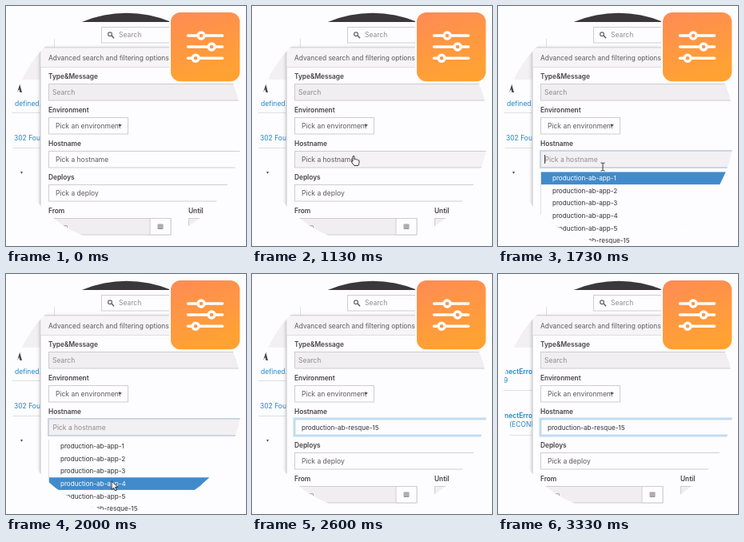
Recreate the animation shown at these times as an HTML page. Size 300 by 300 pixels, loop 3400 ms.

```html
<!DOCTYPE html>
<html lang="en">
<head>
<meta charset="utf-8">
<style>
  html, body { margin: 0; width: 100%; height: 100%; overflow: hidden; background: #fdfcfe; }
  svg { display: block; width: 300px; height: 300px; font: 8.5px Inter, sans-serif; fill: #5c595d; }
  #page text { opacity: var(--fade); }
  .label { font-weight: 600; font-size: 8.3px; fill: #454246; }
  .box { fill: #fdfcfe; stroke: #cfcdd0; }
  .off { fill: #f0eef1; }
  .hint { fill: #8f8c90; }
  .host { font-size: 8.1px; fill: #333; }
  .link { fill: #1f88c9; }
  .rule { stroke: #e0dee1; fill: none; }
</style>
</head>
<body>
<svg viewBox="0 0 300 300">
  <defs>
    <clipPath id="lens"><circle cx="150.7" cy="153.3" r="144.5"/></clipPath>
    <linearGradient id="orange" x1="0" y1="0" x2=".3" y2="1">
      <stop stop-color="#ff8b55"/><stop offset="1" stop-color="#ffa233"/>
    </linearGradient>
    <filter id="shadow" x="-10%" width="120%"><feDropShadow dx="0" dy="1" stdDeviation="2" flood-opacity=".25"/></filter>
  </defs>

  <g clip-path="url(#lens)">
    <rect width="300" height="20" fill="#3b383c"/>
    <path class="rule" d="M60.5 41V52"/>
    <rect class="box" x="119.5" y="26.5" width="110" height="19.5"/>
    <g fill="none" stroke="#666" stroke-width="1.2"><circle cx="130" cy="35.2" r="2.4"/><path d="M132 37L135 40.3" stroke-width="1.6"/></g>
    <text class="hint" x="141" y="39.3">Search</text>

    <g id="page">
      <rect y="52" width="60" height="40" fill="#f2f0f3"/>
      <g id="before">
        <path d="M14 108L17 97L20 108H17.5L16.2 104Z" fill="#4a474b"/>
        <text class="link" x="11" y="124.5">defined.</text>
        <text class="link" x="10" y="168">302 Found</text>
        <path d="M18 207H21L19.5 210Z" fill="#555"/>
        <path class="rule" d="M0 133.5H43M0 177.5H43"/>
      </g>
      <g id="after" class="link">
        <text x="8" y="124.5" font-weight="600">nectError</text>
        <text x="7" y="136">9</text>
        <text x="8" y="179.5" font-weight="600">nectError</text>
        <text x="14" y="191">(ECONN</text>
        <path class="rule" d="M0 145.5H43M0 201.5H43"/>
      </g>

      <rect x="43" y="52" width="270" height="260" fill="#fdfcfe" stroke="#c4c2c5" filter="url(#shadow)"/>
      <rect x="43.5" y="52.5" width="260" height="24" fill="#f6f4f7"/>
      <path class="rule" d="M43 76.5H300"/>
      <text x="53" y="68" font-size="8.4">Advanced search and filtering options</text>
      <g id="form"></g>

      <rect class="box off" x="53.5" y="265.5" width="152.5" height="20.5"/>
      <rect class="box" x="180" y="265.5" width="26" height="20.5"/>
      <text class="hint" x="57" y="279">From</text>
      <path d="M190 273h6v5.5h-6zM190 275h6M190 277h6M192 273v5.5M194 273v5.5" fill="none" stroke="#77747a" stroke-width=".7"/>
      <rect class="box off" x="228.5" y="265.5" width="80" height="20.5"/>
      <path d="M140.2 148.2h4.6l-2.3 2.8z" fill="#4a474b"/>

      <g id="list">
        <rect x="53" y="205" width="260" height="110" fill="#fdfcfe"/>
        <path class="rule" d="M53.5 207V300"/>
        <rect id="mark" x="54" width="260" height="15.6" fill="#428bca"/>
      </g>
    </g>

    <path id="caret" d="M58.5 186V197" stroke="#444"/>
    <g id="cursor" stroke="#222" stroke-width=".9" stroke-linejoin="round" fill="#fff">
      <path id="arrow" d="M0 0V10.5L2.5 8.2L4.2 12L6 11.2L4.4 7.5H7.6Z"/>
      <path id="hand" d="M-1 1Q0-.6 1 1V4.8Q2.4 3.7 3.3 5Q4.7 4.2 5.4 5.6Q7 5.2 7 7V9.2L5.8 12.5H.8L-2.6 8Q-2.8 6.2-1 7.2Z"/>
      <path id="beam" fill="none" d="M-2.5-5Q0-5 0-4Q0-5 2.5-5M0-4V4M-2.5 5Q0 5 0 4Q0 5 2.5 5"/>
    </g>
  </g>

  <rect x="206" y="8" width="86.3" height="86.3" rx="12" fill="url(#orange)" stroke="#fdfcfe" stroke-width="4" paint-order="stroke"/>
  <g id="sliders" stroke="#fff" stroke-width="3.4" stroke-linecap="round" fill="#ff9747"></g>
</svg>
<script>
const $ = id => document.getElementById(id);
const add = (id, markup) => $(id).insertAdjacentHTML("beforeend", markup);
const show = (id, on) => $(id).setAttribute("visibility", on ? "inherit" : "hidden");
const clamp = (v, lo, hi) => Math.min(hi, Math.max(lo, v));
const LOOP = 3400, OPEN = 1300, PICK = 2430, RELOAD = 2770, LOADED = 3200;
const ROW = 15.6, LIST_TOP = 207.5;

[["Type&amp;Message", "Search", 260], ["Environment", "Pick an environment", 99],
 ["Hostname", "Pick a hostname", 260], ["Deploys", "Pick a deploy", 260]].forEach(([label, hint, width], i) => {
  const y = 91 + i * 42;
  add("form", `<text class="label" x="53" y="${y}">${label}</text>
    <rect id="box${i}" class="box${i ? "" : " off"}" x="53.5" y="${y + 6.5}" width="${width}" height="20.5"/>
    <text id="hint${i}" class="${i ? "" : "hint"}" x="${i ? 62 : 58}" y="${y + 19.7}">${hint}</text>`);
});
add("form", `<text class="label" x="53" y="259">From</text><text class="label" x="228" y="259">Until</text>
  <rect id="focus" x="53" y="181" width="260" height="21" fill="none"/>`);

["app-1", "app-2", "app-3", "app-4", "app-5", "resque-15"].forEach((name, i) =>
  add("list", `<text id="row${i}" class="host" x="68" y="${LIST_TOP + 10.6 + i * ROW}">production-ab-${name}</text>`));

[[37, 244], [51, 257], [65.3, 237]].forEach(([y, x]) =>
  add("sliders", `<path d="M227.5 ${y}H270.5"/><circle cx="${x}" cy="${y}" r="4"/>`));

// Cursor stops: time, x, y
const stops = [[40, 236, 76], [520, 141, 148], [640, 141, 148], [1060, 127, 187],
  [1330, 127, 187], [1600, 131, 201], [1730, 131, 201], [2230, 133, 304]];

function cursorAt(t) {
  const next = stops.findIndex(s => s[0] > t);
  if (next < 1) return stops.at(next).slice(1);
  const [t0, x0, y0] = stops[next - 1], [t1, x1, y1] = stops[next];
  const p = (t - t0) / (t1 - t0), e = p * p * (3 - 2 * p);
  return [x0 + (x1 - x0) * e, y0 + (y1 - y0) * e];
}

// Text dims while the page reloads, then comes back
function fadeAt(t) {
  if (t >= LOADED) return .5 + clamp((t - LOADED) / 130, 0, 1) * .5;
  const p = clamp((t - RELOAD) / 290, 0, 1);
  return .5 + .5 * (1 - p) ** 3;
}

function draw(t) {
  const [x, y] = cursorAt(t);
  const open = t >= OPEN && t < PICK, picked = t >= PICK;
  const onEnv = x < 153 && y > 139 && y < 160;
  const onHost = y > 181 && y < 203;

  $("cursor").setAttribute("transform", `translate(${x} ${y})`);
  const shape = open && y < LIST_TOP ? "beam" : onEnv || onHost ? "hand" : "arrow";
  for (const id of ["arrow", "hand", "beam"]) show(id, id === shape);

  $("box1").style.fill = onEnv ? "#f1eff2" : "";
  $("box2").style.fill = open ? "#f2f0f3" : onHost ? "#f4f2f5" : "";
  show("focus", open || picked);
  $("focus").setAttribute("stroke", picked ? "#c0dcf1" : "#c9d6e4");
  $("focus").setAttribute("stroke-width", picked ? 3 : 2);
  show("list", open);
  show("caret", open && (t - OPEN) % 1000 < 500);

  const hint = $("hint2");
  hint.textContent = picked ? "production-ab-resque-15" : "Pick a hostname";
  hint.setAttribute("class", picked ? "host" : open ? "hint" : "");
  hint.setAttribute("x", open ? 58.5 : 62);

  const active = clamp(Math.floor((y - LIST_TOP) / ROW), 0, 5);
  $("mark").setAttribute("y", LIST_TOP + active * ROW);
  for (let i = 0; i < 6; i++) $("row" + i).style.fill = i === active ? "#fff" : "";

  show("before", t < LOADED);
  show("after", t >= LOADED);
  $("page").style.setProperty("--fade", fadeAt(t));
}

const start = performance.now();
function tick() {
  draw((performance.now() - start) % LOOP);
  requestAnimationFrame(tick);
}
tick();
</script>
</body>
</html>
```
